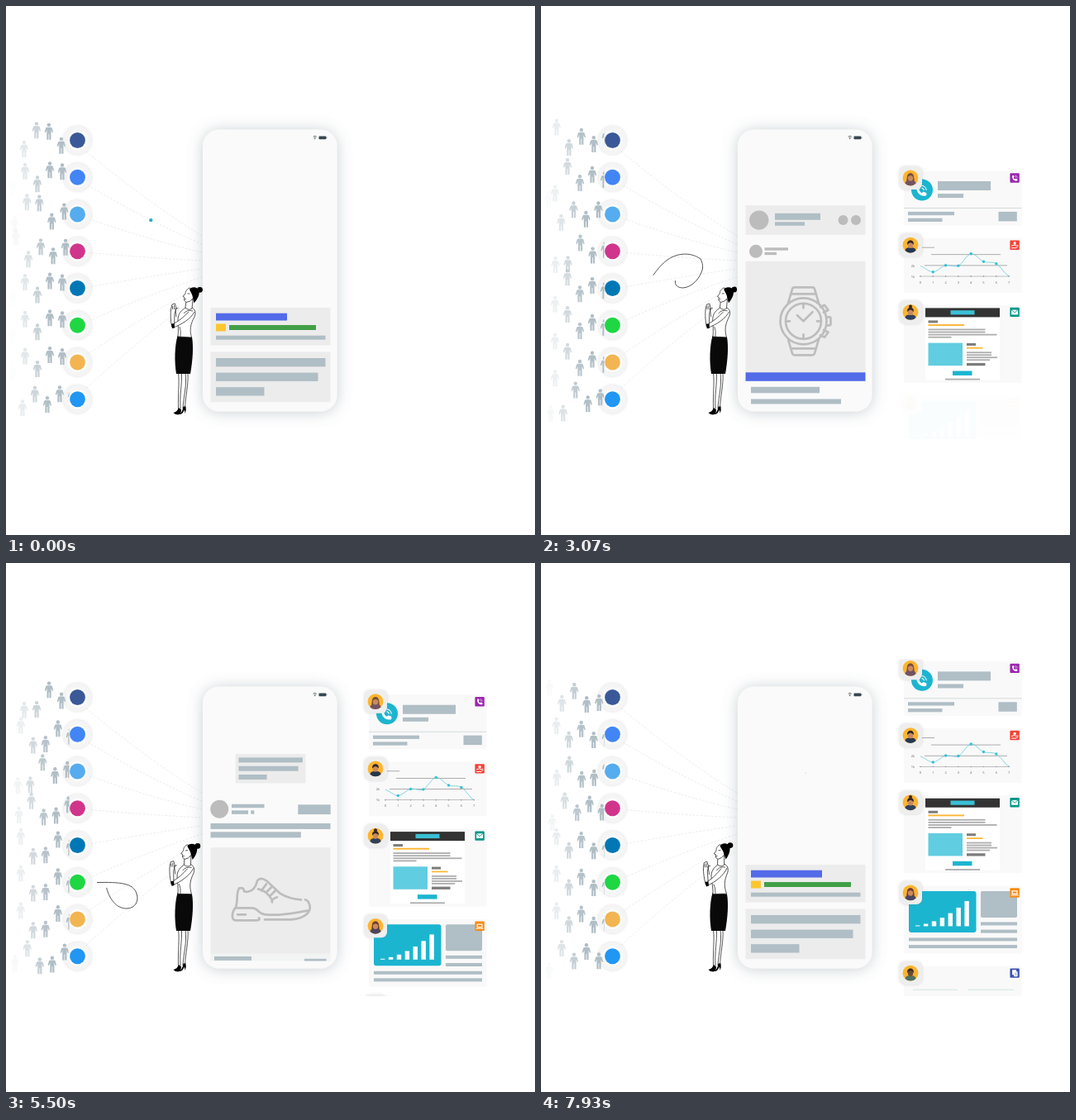
These frames come from a looping animation (640x640 px, 8000 ms). An HTML page:

```html
<!DOCTYPE html>
<html lang="en">
<head>
<meta charset="utf-8">
<title>Social feed to phone</title>
<style>
html, body { margin: 0; width: 100%; height: 100%; overflow: hidden; background: #fff; }
svg { display: block; width: 100vw; height: 100vh; }
text { font: 4px "Open Sans", Arial, sans-serif; fill: #666; text-anchor: middle; }
.line { fill: none; stroke: #bdbdbd; stroke-width: 2.7; stroke-linecap: round; stroke-linejoin: round; }
.ink { fill: #fff; stroke: #222; stroke-width: .75; stroke-linejoin: round; }
.thin { fill: none; stroke: #222; stroke-width: .7; }
.glyph { fill: none; stroke: #fff; stroke-width: 1; }
</style>
</head>
<body>
<svg id="stage" viewBox="0 0 640 640"></svg>
<script>
const LOOP = 8000;
const GREY = '#b0bec5', PALE = '#ececec', MID = '#bcbcbc', TEAL = '#1cb5d0', BLUE = '#536be8';
const stage = document.getElementById('stage');

const range = n => [...Array(n).keys()];
const rect = (x, y, w, h, fill = GREY, r = 0) =>
  `<rect x="${x}" y="${y}" width="${w}" height="${h}" rx="${r}" fill="${fill}"/>`;
const disc = (x, y, r, fill, more = '') => `<circle cx="${x}" cy="${y}" r="${r}" fill="${fill}" ${more}/>`;
const path = (d, attrs = '') => `<path d="${d}" ${attrs}/>`;
const at = (x, y, body, k = 1) => `<g transform="translate(${x} ${y}) scale(${k})">${body}</g>`;
// Text lines of the given widths, stacked downward
const lines = (x, y, step, h, widths, fill) => widths.map((w, i) => rect(x, y + step * i, w, h, fill)).join('');
const ramp = (t, a, b) => Math.min(1, Math.max(0, (t - a) / (b - a)));
const ease = (t, a, b) => { const p = ramp(t, a, b); return p * p * (3 - 2 * p); };

// Networks on the left
const rowY = i => 162.5 + 44.75 * i;
const networks = ['#3b5998', '#4285f4', '#55acee', '#d0358b', '#0077b5', '#1fd743', '#f3b551', '#2196f3'];
const plates = networks.map((c, i) =>
  disc(86.5, rowY(i), 17, '#f5f5f5', 'filter="url(#soft)"') + disc(86.5, rowY(i), 12, '#fdfdfd')).join('');
const badges = networks.map((c, i) => disc(86.5, rowY(i), 9.4, c)).join('');

const wires = networks.map((c, i) => {
  const tilt = 3.5 - i, y0 = rowY(i) + 3.8 * tilt, y1 = 278 + 10 * i;
  return path(`M${104 - 2 * Math.abs(tilt)} ${y0}Q170 ${(y0 + y1) / 2 + 2.8 * tilt} 237 ${y1}`);
}).join('');

// People walk in a zigzag file toward each badge; a row that starts ahead walks a little slower
const WALKERS = 14;
const rowLead = [-1.27, 0, -2.18, 1.5, 0, 0, 0, .94];
const drift = n => {
  const side = (n + Math.floor((n + 3) / 6)) % 2 ? 1 : -1;
  return side * (.17 + .07 * Math.cos(Math.PI / 3 * (n - 8)));
};
const figure = disc(0, -7.8, 2.2, GREY) + path('M-2.6-5H2.6C4-5 4.4-2 5.2 1L4 1.6 2.6-1.6V10H.4V3H-.4V10H-2.6V-1.6' +
  'L-4 1.6-5.2 1C-4.4-2-4-5-2.6-5Z', `fill="${GREY}"`);

// Phone feed
const watch = disc(260, 166.5, 8, MID) + lines(270.5, 162, 5.5, 3.4, [28.5, 14.5], MID) +
  rect(247.5, 178.5, 145, 135, PALE) + rect(247.5, 313, 145, 10.5, BLUE) + lines(254, 330.5, 14.7, 7.5, [83, 109]) +
  `<g class="line"><circle cx="317.5" cy="251" r="28"/><circle cx="317.5" cy="251" r="21.5"/>` +
  [1, -1].map(side => `<g transform="translate(317.5 251) scale(1 ${side})">` +
    path('M-18.500-22L-13.500-39Q-13-41-10.500-41H10.500Q13-41 13.500-39L18.500-22M-14.500-33H14.500' +
      'M0-21V-16M20.500-17L25.500-19.500 30-13.500 24.500-10.500') + '</g>').join('') +
  path('M310 244L317.500 251 328.500 240M297 251H301M334 251H338M346 246H349Q350.500 246 350.500 248V254Q350.500 256 349 256H346') + '</g>';
const offer = rect(247.5, 365, 145, 45.5, PALE) + rect(254, 371.7, 86, 8.8, BLUE) +
  rect(254, 384.5, 12, 9, '#fcc62d') + rect(270, 386, 105, 6, '#439f47') + rect(254, 398.7, 132.5, 5);
const note = rect(247.5, 418.5, 145, 60.7, PALE) + lines(254, 426, 17.6, 10.3, [132.5, 123.5, 58.5]);
const profile = rect(247.5, 111, 145, 35.5, PALE) + disc(263.8, 128.8, 11.7, MID) +
  rect(283, 120.5, 55, 8) + rect(283, 131, 36, 4.5) + disc(365.5, 128.8, 6, MID) + disc(381, 128.8, 6, MID);
const shoe = at(0, -387, disc(258.2, 250.5, 11, MID) +
  lines(273, 244.4, 7.6, 4.5, [39.5, 20]) + rect(296.3, 252, 4, 4.4) + rect(353.3, 245, 39.4, 11.8) +
  lines(247.5, 267.6, 10.4, 7, [145, 109.3]) + rect(247.5, 297, 145, 128.5, PALE) + rect(247.5, 425.5, 145, 19.5, '#f2f3f3') +
  lines(252, 428.6, 7.4, 4.9, [45, 59]) + rect(361, 431.5, 26.5, 6) + rect(250.5, 453, 36.5, 7) + rect(299.5, 453, 90, 7) +
  range(3).map(i => rect(250.5 + 51.2 * i, 472.4, 36.5, 7)).join('') + rect(250.5, 465.6, 139, 1, '#999') +
  `<g class="line">` + path('M282 346C278 353 281 361 278 369C273 375 272 385 278 385H303Q308 385 306 382' +
    'M283 346Q288 345 288 350C296 352 302 347 304 337Q308 332 315 337L331 352Q342 359 357 360' +
    'M279 370H297C306 370 305 378 315 378C335 380 352 375 367 373M313 384H345C362 383 372 374 366 363Q365 361 362 360' +
    'M280 378H290M305 347Q315 349 321 359M328 357Q320 360 322 363M309 349L315 341M315 351L321 345M320 355L326 349') + '</g>');

const CYCLE = 634.5, POP = .9;
const item = (body, pivot, start, shift = 0) => ({ body, pivot, start, shift });
const feed = [
  item(watch, 254, 0), item(offer, 388, -1), item(note, 449, -1), item(profile, 128.5, 1.62), item(shoe, -27, 3.145),
  item(note, 449, 5, -CYCLE), item(offer, 388, 6.4, -CYCLE), item(watch, 254, 7.88, -CYCLE)
];
const scrollAt = t => 62.5 * ease(t, 1, 2.2) + 324.5 * ease(t, 2.55, 4.32) + 56 * ease(t, 4.9, 5.7) + 191.5 * ease(t, 6.4, 7.75);

// Cards on the right
const handset = path('M-5-6C-7 1-1 8 6 5.500L6 2.500 2.500 1 .8 2.500C-1 1.700-2 .3-2.500-1.500L-1-3-2-6Z', 'fill="#fff"') +
  path('M.5-6A6 6 0 0 1 6-.5M.5-3.200A3 3 0 0 1 3.200-.5', 'class="glyph"');
const tag = (fill, icon) => rect(567.4, 2.8, 11.4, 11.4, fill, 1) + at(573.1, 8.5, icon);
const avatar = (hair, suit, style, skin = '#c98a62') =>
  rect(433.5, -5.5, 27.5, 28, '#eee', 7).replace('/>', ' filter="url(#soft)"/>') +
  at(447, 8.5, disc(0, 0, 9.4, '#fdb52f') +
    (style === 'long' ? path('M-4.500 5C-6-9 6-9 4.500 5Z', `fill="${hair}"`) : '') +
    (style === 'bun' ? disc(0, -6.8, 2, hair) : '') +
    path('M-6.500 6.800A9.400 9.400 0 0 0 6.500 6.800C6 3 3 3 0 3S-6 3-6.500 6.800Z', `fill="${suit}"`) +
    `<ellipse cy="-.5" rx="3.300" ry="4.200" fill="${skin}"/>` +
    path('M-3.800-.5C-5-7.500 5-7.500 3.800-.5Q2-3 0-3T-3.800-.5Z', `fill="${hair}"`));

const call = disc(461, 23, 13, TEAL) + at(460, 24, handset, 1.05) + rect(480, 12.5, 64, 11) + rect(480, 27.6, 31, 5) +
  lines(444, 49.4, 7.8, 4.3, [56, 41.5]) + rect(553.5, 49.4, 22.3, 11.5) + rect(439, 44.6, 142.5, .8, '#ccd2d4') +
  tag('#9b27af', at(0, .2, handset, .55)) + avatar('#795039', '#735263', 'long');

const levels = [34, 41, 33, 33.5, 19, 28.5, 31, 46];
const tickX = n => 459 + 15.3 * n;
// Smooth curve through evenly spaced levels
const curve = levels.slice(1).reduce((d, y, n) => {
  const slope = k => ((levels[k + 1] ?? levels[k]) - (levels[k - 1] ?? levels[k])) / 6;
  return d + `C${tickX(n + 1 / 3)} ${levels[n] + slope(n)} ${tickX(n + 2 / 3)} ${y - slope(n + 1)} ${tickX(n + 1)} ${y}`;
}, `M${tickX(0)} ${levels[0]}`);
const chart = rect(460, 11, 16, .8, '#999') + rect(472, 19.6, 84, .8, '#999') + rect(464, 32.8, 100, .8, '#999') +
  rect(458, 46, 109, .6, '#999') + '<text x="450" y="35">2k</text><text x="450" y="48">1k</text>' +
  levels.map((y, n) => `<text x="${tickX(n)}" y="55">${n}</text>` + disc(tickX(n), 46.3, .7, '#789')).join('') +
  path(curve, 'fill="none" stroke="#64cddd" stroke-width=".8"') +
  levels.slice(1, -1).map((y, n) => disc(tickX(n + 1), y, 1.7, '#35c0d7')).join('') +
  tag('#f44236', disc(0, -2.2, 1.7, '#fff') + path('M-4 1Q0-1 2 1L4 0M-4 3.500H2L4.300 1', 'class="glyph"')) +
  avatar('#30262a', '#27364e', 'short');

const DARK = '#7c7c7c', AMBER = '#ffb533', SOFT = '#adadad';
const mail = rect(465, 3.5, 90, 87, '#fff') + rect(465, 3.5, 90, 11, '#333') + rect(495.5, 6.3, 29, 5.2, '#3abfd5') +
  rect(468.5, 18.5, 11.5, 3, DARK) + rect(468.5, 23.2, 43.5, 1.9, AMBER) + lines(468.5, 28.6, 3.1, 1.8, [69, 69, 83, 28], SOFT) +
  rect(468.5, 45.7, 41.5, 27.5, '#61cde0') + rect(515, 46, 11, 3, DARK) + rect(515, 51, 19.5, 1.7, AMBER) +
  lines(515, 56.4, 3, 1.8, [30, 30, 37, 28], SOFT) + rect(515, 70, 22.5, 3.3, DARK) +
  rect(498, 79.6, 23.5, 5.4, TEAL) + rect(489, 88.8, 42, 1.8, SOFT) +
  tag('#009687', rect(-4, -2.8, 8, 5.8, '#fff') + path('M-4-2.800L0 .5 4-2.800', 'fill="none" stroke="#009687" stroke-width=".9"')) +
  avatar('#30262a', '#31405c', 'bun');

const growthBar = i => { const h = 1 + 1.3 * i + .6 * i * i; return rect(453 + 9.9 * i, 49 - h, 5.4, h, '#fff'); };
const growth = rect(445, 6.5, 81.5, 50, TEAL, 3) + range(7).map(growthBar).join('') + rect(532, 6.5, 44, 32, GREY, 2) +
  lines(532, 44, 9.2, 4, [44, 44]) + lines(445, 63, 8.6, 4, [131, 131]) +
  tag('#f98b12', rect(-3.5, -2.7, 7, 4.6, '#fff') + rect(-4.5, 2.5, 9, 1, '#fff') + rect(-2.3, -1.5, 4.6, 2.2, '#f98b12')) +
  avatar('#713c35', '#4a4660', 'long');

const report = rect(450, 28.2, 54, .8, '#c8dfe0') + rect(517, 28.2, 55, .8, '#c8dfe0') +
  tag('#3f51b5', rect(-3, -4, 5, 6, '#fff', .6) + rect(-1, -2, 4.5, 6, '#fff', .6) + path('M0 0H2.500M0 2H2.500', 'stroke="#3f51b5" stroke-width=".6"')) +
  avatar('#3a2c28', '#50705c', 'short', '#6b4a35');

let stackY = 0;
const cards = [[call, 66], [chart, 66], [mail, 94], [growth, 82], [report, 90]].map(([body, height]) => {
  const card = { body: rect(439, 0, 142.5, height, '#f9f9f9') + body, y: stackY };
  stackY += height + 15.2;
  return card;
});

// Woman
const legs = path('M208.500 444C210 456 208 468 208.500 487L211 487C210 470 213 458 212.500 444ZM217 444C219 460 215 470 214 487L216.500 487C217 472 221 458 220 444Z', 'class="ink"') +
  path('M202.500 492Q207 491 208.500 486.500L212 488Q212 494 208 494.500Q204 494 202.500 492ZM210 494Q214 490 214.500 484.500L217.500 484.500Q218.500 489 216.500 493L216 488.500Q213 494.500 210 494Z') +
  path('M207.500 399C204 412 203.500 430 206 445H223C226 428 227 412 225 400.500Z', 'fill="#090909"');
const torso = path('M208 400C209 392 208 387 208 380C208 372 212 368 219 364L225 365C229 367 230 371 228 376C223 385 222 392 224.500 401Z', 'class="ink"') +
  path('M217 365L218 356 226 355 225 366Q221 369 217 365Z', 'class="ink"') +
  path('M222 341C218 343 217 346 217 348L214 351.500 216 352.500 215.500 356 218 358.500Q223 358 226 354L229 345Z', 'class="ink"') +
  path('M219.500 348H222.500M216 355L218 354.500', 'class="thin"') +
  path('M222 343C224 339.500 231 339 233.500 344C235 350 230 357 227.500 359.500C226 354 226 350 224 347Z') +
  disc(234.5, 343.3, 3.4, '#000') +
  path('M228 370C224 378 212 386 202 389L200.500 385C209 382 215 376 221 370', 'class="ink"') +
  path('M200.500 388C199 380 199 373 199.500 367L201 361 204.500 360 206 366 204 372 203.500 387Z', 'class="ink"') +
  path('M206 376L205 366 208.500 365.500M201.500 363V367M203.500 362V367M215 372Q219 367 226 369M210 388Q212 393 211 400', 'class="thin"') +
  path('M200 384.500L203.500 384 204 389.500 201 390Z');

const trailPath = 'M196 319C190 312 178 313 170 320C160 329 159 341 172 341C184 340 193 328 195.500 318C196 313 195 310 193 306' +
  'C182 298 166 298 153 307C133 322 120 352 119 376C120 396 128 418 146 418C157 418 161 408 158 400C154 387 138 386 110 386.500';

// Pulses: [wire, start second]
const PULSE = .75;
const pulses = [[1, -.42], [5, .37], [4, 2.28], [3, 3.62], [1, 4.36], [6, 6.06]];

const group = (id, list) => `<g id="${id}">${list.map(b => `<g>${b}</g>`).join('')}</g>`;
const clip = (id, x, y, w, h) => `<clipPath id="${id}">${rect(x, y, w, h)}</clipPath>`;
stage.innerHTML = `<defs>
  <filter id="soft" x="-40%" y="-40%" width="180%" height="180%"><feDropShadow dx="0" dy="0" stdDeviation="1.8" flood-color="#777" flood-opacity=".3"/></filter>
  <filter id="glow" x="-30%" y="-20%" width="160%" height="140%"><feDropShadow dx="0" dy="1" stdDeviation="9" flood-color="#6b7a82" flood-opacity=".36"/></filter>
  ${clip('left', 0, 110, 76.5, 410)}${clip('screen', 238, 165, 163, 316.5)}${clip('right', 425, 116.5, 165, 407.5)}</defs>
  <g id="wires" fill="none" stroke="#e4e6e7" stroke-width=".8" stroke-dasharray="2.500 2">${wires}</g>
  ${plates}<g clip-path="url(#left)">${group('crowd', range(networks.length * WALKERS).map(() => figure))}</g>${badges}
  <rect x="238" y="149.500" width="162.500" height="341" rx="20" fill="#fafafa" filter="url(#glow)"/>
  <path d="M371.700 158.200Q373.700 156.300 375.700 158.200M372.700 159.500Q373.700 158.600 374.700 159.500" fill="none" stroke="#37474f" stroke-width=".8"/>
  ${disc(373.7, 160.6, .6, '#37474f')}${rect(378.5, 157.4, 8.8, 3.8, '#37474f', .6)}${rect(387.5, 158.5, .7, 1.6, '#37474f')}
  <g clip-path="url(#screen)">${group('feed', feed.map(f => f.body))}</g>
  <path id="trail" d="${trailPath}" fill="none" stroke="#555" stroke-width="1"/>
  ${legs}<g id="torso">${torso}</g>
  ${group('pulses', pulses.map(() => disc(0, 0, 2.2, '#20b2cf')))}
  <g clip-path="url(#right)">${group('cards', cards.map(c => c.body))}</g>`;

const el = id => document.getElementById(id);
const kids = id => [...el(id).children];
const people = kids('crowd'), wireEls = kids('wires'), feedEls = kids('feed'), pulseEls = kids('pulses'), cardEls = kids('cards');
const trail = el('trail'), trailLength = trail.getTotalLength();
const move = (node, x, y) => node.setAttribute('transform', `translate(${x} ${y})`);

function draw(t) {
  people.forEach((node, i) => {
    const row = Math.floor(i / WALKERS), n = i % WALKERS, lead = rowLead[row];
    const x = 98 - 15 * n + 12.7 * (lead + (1 - .06 * lead) * t);
    move(node, x, rowY(row) + drift(n) * (97 - x));
    node.setAttribute('opacity', x > 82 ? 0 : ramp(x, 7, 52));
  });

  const scroll = scrollAt(t);
  feed.forEach(({ pivot, start, shift }, i) => feedEls[i].setAttribute('transform',
    `translate(320 ${pivot + shift + scroll}) scale(${ease(t, start, start + POP)}) translate(-320 ${-pivot})`));

  cards.forEach(({ y }, i) => {
    const start = .6 + .82 * i;
    move(cardEls[i], 0, 250.5 - 16.6 * t + y);
    cardEls[i].setAttribute('opacity', ramp(t, start, start + .7));
  });

  pulses.forEach(([wire, start], i) => {
    const p = (t - start) / PULSE, on = p >= 0 && p <= 1;
    pulseEls[i].setAttribute('opacity', on ? 1 : 0);
    if (!on) return;
    const pt = wireEls[wire].getPointAtLength(p * wireEls[wire].getTotalLength());
    move(pulseEls[i], pt.x, pt.y);
  });

  const head = trailLength * ramp(t, 1.53, 4.74), tail = trailLength * ramp(t, 2.55, 6.92);
  trail.setAttribute('stroke-dasharray', `0 ${tail} ${Math.max(0, head - tail)} 999`);
  trail.setAttribute('opacity', head > tail ? 1 : 0);
  el('torso').setAttribute('transform', `rotate(${-5.6 * (t / 8) ** 2} 215 400)`);
}

const begin = performance.now();
function tick() {
  draw((performance.now() - begin) % LOOP / 1000);
  requestAnimationFrame(tick);
}
tick();
</script>
</body>
</html>
```
